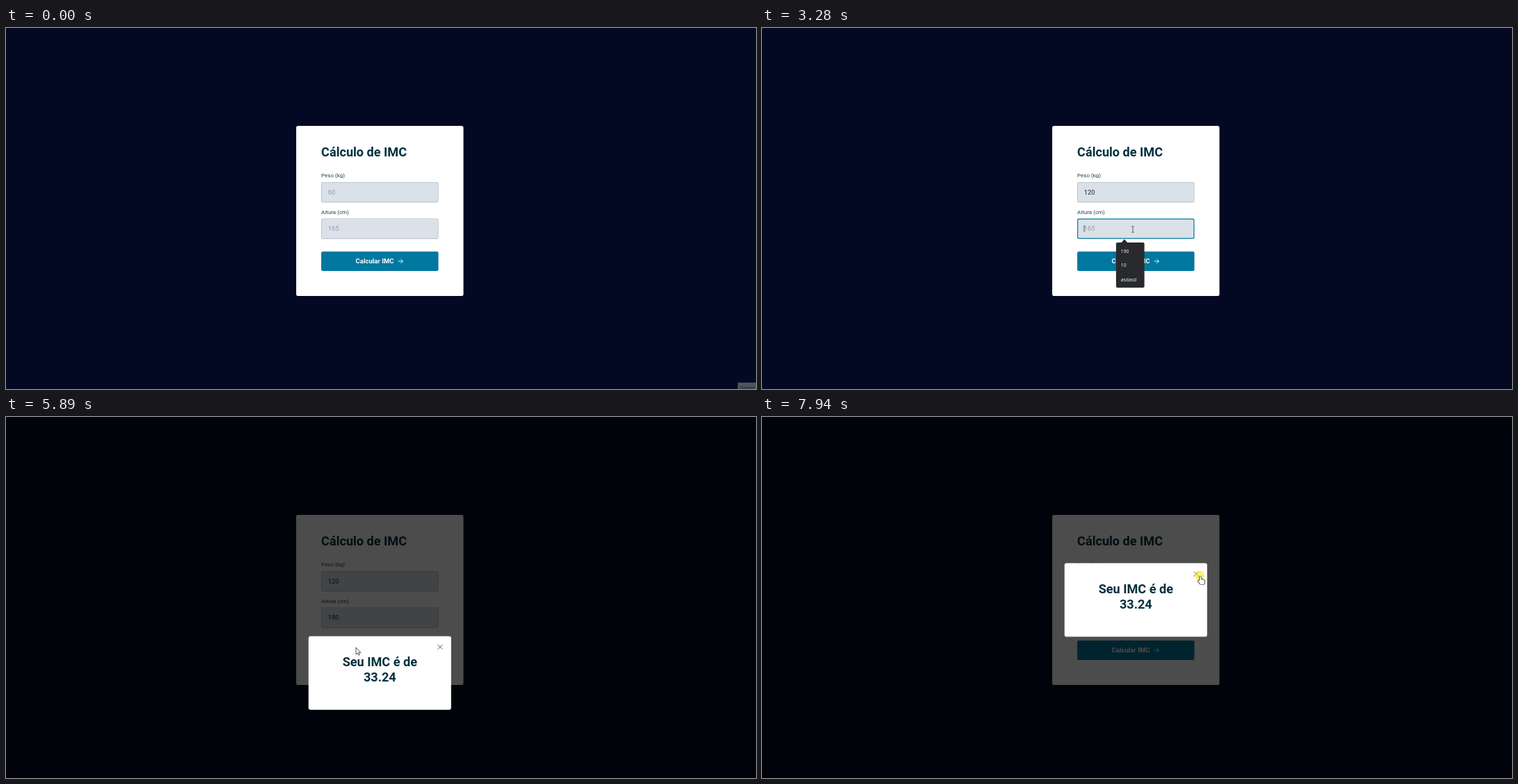
An HTML page with a canvas for the animation above (8000 ms loop, 1078 by 520 pixels).

```html
<!DOCTYPE html>
<html lang="pt-BR">
<head>
<meta charset="utf-8">
<title>Cálculo de IMC</title>
<style>
  html, body { margin: 0; width: 100%; height: 100%; overflow: hidden; background: #030922; }
  canvas { display: block; }
</style>
</head>
<body>
<canvas id="stage" width="1078" height="520"></canvas>
<script>
const stage = document.getElementById('stage');
const ctx = stage.getContext('2d', { alpha: false });
const LOOP = 8000;
const CENTER = 537.3;
const BLINK = 560;
const CLICK = 150;
const ROW = 20.4;
const OPEN_AT = 5890;
const RISE_TIME = 920;

const HEADING = 'bold 18.1px Roboto, sans-serif';
const LABEL = '8px Roboto, sans-serif';
const INPUT = '9.4px Roboto, sans-serif';
const BUTTON = 'bold 9.5px Roboto, sans-serif';
const MENU = '6.75px "Open Sans", sans-serif';
const NAVY = '#030922', INK = '#04303f', TEAL = '#00789f';

const centered = (y, w, h) => ({ x: CENTER - w / 2, y, w, h });
const card = centered(140.9, 240.4, 245.2);
const button = centered(321.9, 168.4, 28.1);
const modal = centered(210.5, 205, 106);

const fields = [
  { label: 'Peso (kg)', hint: '60', value: '120', menu: ['80', '70', '100', 'asdasd'],
    focus: 780, blur: 3130, typeAt: 1810, keyTime: 200 },
  { label: 'Altura (cm)', hint: '165', value: '190', menu: ['190', '10', 'asdasd'],
    focus: 3130, blur: 5810, typeAt: 4210, keyTime: 215 }
].map((f, i) => ({ ...f, ...centered(222 + 52.5 * i, 168.4, 29.2) }));

// Places the pointer rests at, and when it travels there
const stops = [
  { x: 1076, y: 522 },
  { x: 531, y: 231, leave: 70, arrive: 680 },
  { x: 830, y: 257, leave: 1100, arrive: 1440, sag: 18 },
  { x: 533, y: 290, leave: 2400, arrive: 3100 },
  { x: 503, y: 332, leave: 4960, arrive: 5590 },
  { x: 629, y: 228.5, leave: 6900, arrive: 7600 }
];
const clicks = [fields[0].focus - 50, fields[1].focus, 5810, 7940];

const clamp = v => Math.min(1, Math.max(0, v));
const mix = (a, b, p) => a + (b - a) * p;
const during = (t, from, to) => t >= from && t < to;
const inside = (p, r) => p.x >= r.x && p.x <= r.x + r.w && p.y >= r.y && p.y <= r.y + r.h;

function text(str, x, y, font, color, align = 'left') {
  ctx.font = font;
  ctx.fillStyle = color;
  ctx.textAlign = align;
  ctx.fillText(str, x, y);
}

function box({ x, y, w, h }, r, fill) {
  ctx.beginPath();
  ctx.roundRect(x, y, w, h, r);
  ctx.fillStyle = fill;
  ctx.fill();
}

function line(color, width, ...points) {
  ctx.strokeStyle = color;
  ctx.lineWidth = width;
  ctx.beginPath();
  points.forEach(([x, y]) => ctx.lineTo(x, y));
  ctx.stroke();
}

function cover(color) {
  ctx.fillStyle = color;
  ctx.fillRect(0, 0, stage.width, stage.height);
}

function pointerAt(t) {
  return stops.reduce((from, to) => {
    const p = clamp((t - to.leave) / (to.arrive - to.leave));
    const eased = p * p * (3 - 2 * p);
    const sag = (to.sag || 0) * Math.sin(Math.PI * p);
    return { x: mix(from.x, to.x, eased), y: mix(from.y, to.y, eased) + sag };
  });
}

function modalTop(t) {
  return modal.y + 105.5 * (1 - clamp((t - OPEN_AT) / RISE_TIME)) ** 3;
}

function typed(f, t) {
  return f.value.slice(0, Math.max(0, Math.floor((t - f.typeAt) / f.keyTime) + 1));
}

function caretShown(f, t) {
  const keysEnd = f.typeAt + f.keyTime * (f.value.length - 1);
  const since = t < f.typeAt ? f.focus + CLICK / 2 : Math.min(t, keysEnd);
  return Math.floor(Math.max(0, t - since) / BLINK) % 2 === 0;
}

function drawField(f, t) {
  const focused = during(t, f.focus, f.blur);
  const value = typed(f, t);
  const edge = focused ? 1.2 : 0.6;
  const inner = { x: f.x + edge, y: f.y + edge, w: f.w - 2 * edge, h: f.h - 2 * edge };
  const left = f.x + 9.6;
  text(f.label, f.x, f.y - 7, LABEL, '#1d4653');
  box(f, 2.3, focused ? TEAL : '#a5b1bb');
  box(inner, 1.6, '#dae1e8');
  text(value || f.hint, left, f.y + 17.8, INPUT, value ? '#1c262c' : '#959da4');
  if (focused && caretShown(f, t)) {
    ctx.fillStyle = '#10181c';
    ctx.fillRect(left + ctx.measureText(value).width, f.y + 9.6, 0.7, 9.8);
  }
}

function drawMenu(f, t) {
  const value = typed(f, t);
  const items = f.menu.filter(s => s.startsWith(value) && s !== value);
  if (!items.length || !during(t, f.focus + 80, f.blur)) return;
  const tip = f.x + 67.8;
  const top = f.y + 34.4;
  ctx.font = MENU;
  const textWidth = Math.max(20, ...items.map(s => ctx.measureText(s).width));
  box({ x: tip - 12, y: top, w: textWidth + 18.5, h: ROW * items.length + 4 }, 2, '#292a2d');
  ctx.beginPath();
  ctx.moveTo(tip - 4.7, top + 0.5);
  ctx.lineTo(tip, top - 4.6);
  ctx.lineTo(tip + 4.7, top + 0.5);
  ctx.fill();
  items.forEach((s, i) => text(s, tip - 5.1, top + 15 + ROW * i, MENU, '#fff'));
}

function drawButton(hover) {
  const y = button.y + button.h / 2;
  const tip = 570.5;
  box(button, 2, hover ? '#00627f' : TEAL);
  text('Calcular IMC', 502.6, y + 3.3, BUTTON, '#fff');
  line('#fff', 0.9, [tip - 7, y], [tip, y]);
  line('#fff', 0.9, [tip - 3.1, y - 3.1], [tip, y], [tip - 3.1, y + 3.1]);
}

function drawModal(t) {
  const y = modalTop(t);
  const cross = { x: 624, y: y + 15.6 };
  cover('rgba(0,0,0,.7)');
  box({ ...modal, y }, 2.8, '#fff');
  text('Seu IMC é de', CENTER, y + 43.8, HEADING, INK, 'center');
  text('33.24', CENTER, y + 65.3, HEADING, INK, 'center');
  for (const s of [-3.4, 3.4]) {
    line('#4a656f', 1, [cross.x - 3.4, cross.y - s], [cross.x + 3.4, cross.y + s]);
  }
}

function drawArrow() {
  const shape = new Path2D('M0 0V10L2.3 7.9 3.8 11.2 5.3 10.5 3.9 7.3H6.9Z');
  ctx.fill(shape);
  ctx.stroke(shape);
}

function drawHand() {
  const shape = new Path2D();
  shape.roundRect(-0.2, 0.8, 2, 8, 1);
  for (let i = 1; i < 4; i++) shape.roundRect(1.8 * i - 0.2, 4.6 + 0.4 * i, 2, 4, 1);
  shape.roundRect(-2.4, 7.2, 4, 2.2, 1);
  shape.roundRect(-0.4, 7, 7.4, 5.4, 2);
  ctx.lineWidth = 1.3;
  ctx.stroke(shape);
  ctx.fill(shape);
}

function drawBeam() {
  line('#333b40', 0.8, [0, -4.2], [0, 4.2]);
  for (const y of [-4.3, 4.3]) line('#333b40', 0.7, [-1.8, y], [1.8, y]);
}

function pointerShape(p, t) {
  if (t >= OPEN_AT) {
    return Math.hypot(p.x - 624, p.y - modalTop(t) - 15.6) < 8 ? drawHand : drawArrow;
  }
  if (inside(p, button)) return drawHand;
  return fields.some(f => inside(p, f)) ? drawBeam : drawArrow;
}

function drawPointer(p, t) {
  const pressed = clicks.some(c => during(t, c, c + CLICK)) && !during(t, OPEN_AT, OPEN_AT + CLICK);
  ctx.save();
  ctx.translate(p.x, p.y);
  if (pressed) {
    ctx.beginPath();
    ctx.arc(0, 0, 7, 0, 2 * Math.PI);
    ctx.fillStyle = 'rgba(250,230,0,.56)';
    ctx.fill();
  }
  ctx.fillStyle = '#fff';
  ctx.strokeStyle = '#111';
  ctx.lineWidth = 0.7;
  pointerShape(p, t)();
  ctx.restore();
}

function drawTooltip() {
  box({ x: 1051.5, y: 510.5, w: 27, h: 10 }, 0, '#2e303d');
  box({ x: 1052, y: 511, w: 26, h: 9 }, 0, '#50525f');
  text('Gravar', 1054.5, 521, '7px "Open Sans", sans-serif', '#161826');
}

function draw(t) {
  const pointer = pointerAt(t);
  cover(NAVY);
  box(card, 2.8, '#fff');
  text('Cálculo de IMC', button.x, 185.3, HEADING, INK);
  fields.forEach(f => drawField(f, t));
  drawButton(t < OPEN_AT && inside(pointer, button));
  fields.forEach(f => drawMenu(f, t));
  if (t >= OPEN_AT) drawModal(t);
  if (t < stops[1].leave) drawTooltip();
  else drawPointer(pointer, t);
}

const start = performance.now();
function tick() {
  draw((performance.now() - start) % LOOP);
  requestAnimationFrame(tick);
}
tick();
</script>
</body>
</html>
```
